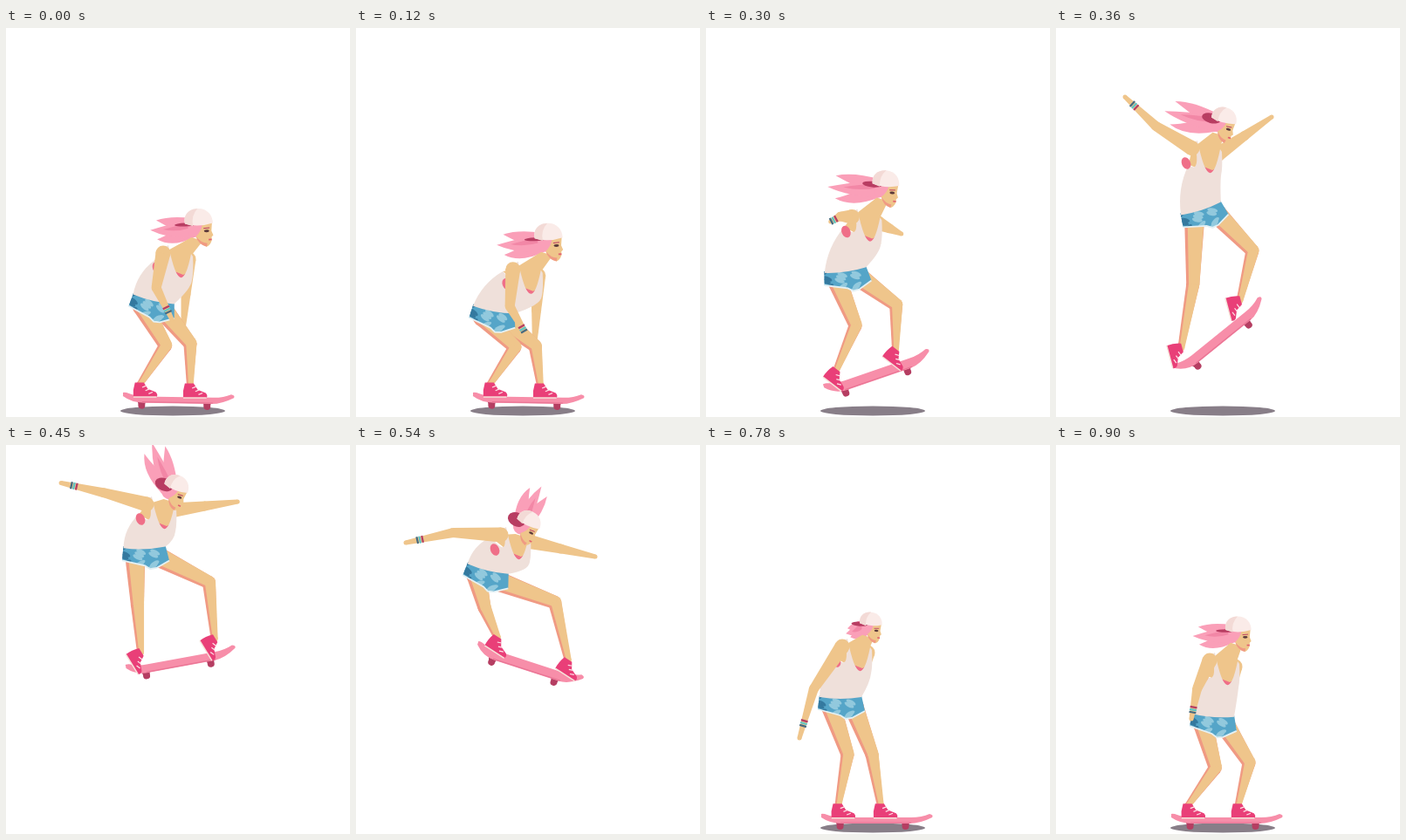
These frames come from a looping animation (394x446 px, 930 ms). An HTML page with a canvas:

```html
<!DOCTYPE html>
<html lang="en">
<head>
<meta charset="utf-8">
<title>Skater</title>
<style>
  html, body { margin: 0; width: 100%; height: 100%; overflow: hidden; background: #fff; }
  canvas { display: block; width: 394px; height: 446px; }
</style>
</head>
<body>
<canvas id="stage" width="394" height="446"></canvas>
<script>
const LOOP = 930, STEP = 30, DECK = 127, HIPS = 48;
const ctx = document.getElementById('stage').getContext('2d');
const C = {
  skin: '#efc58b', shade: '#f09a83', hair: '#fa9fb8', hairDark: '#f287a6',
  cap: '#faebe8', capShade: '#f3dad6', visor: '#b83d62', tank: '#efe0da',
  denim: '#55a5c8', denimLight: '#92c9dd', denimDark: '#34799f',
  shoe: '#e93f78', deck: '#f78ea9', deckDark: '#ea7595', wheel: '#b53e62',
  bra: '#ef6f88', ink: '#5b3a3a', shadow: '#887e88'
};

// Key poses; everything else is derived from these few joints.
// head: x, y, tilt, size    hair: angle, length    hips: x, y, tilt
// knees: sideways bend of each leg    arm: hand x, y, elbow bend
// board: tail x, y, angle    feet: tilt, place of the front foot on the deck
const poses = [
  { at: 0, head: [220, 225, -2, 1], hair: [177, 49], collar: [200, 256], hips: [169, 311, 13],
    arm: [190, 334, -13], farHand: [203, 345], knees: [28, 16], board: [134, 419, 1], feet: [0, .6] },
  { at: 240, head: [219, 249, -2, 1], hair: [177, 56], collar: [199, 283], hips: [153, 332, 4],
    arm: [200, 365, -12], farHand: [206, 370], knees: [35, 19], board: [134, 419, 1], feet: [0, .6] },
  { at: 360, head: [191, 107, 15, .91], hair: [193, 62], collar: [176, 136], hips: [166, 207, -18],
    arm: [79, 79, 5], farHand: [247, 102], knees: [6, 29], board: [135, 388, -39], feet: [75, .83] },
  { at: 540, head: [196, 91, 25, .88], hair: [297, 50], collar: [186, 101], hips: [151, 142, 14],
    arm: [57, 112, -7], farHand: [274, 128], knees: [-3, 33], board: [140, 226, 18], feet: [33, .82] },
  { at: 660, head: [195, 160, 17, .81], hair: [218, 42], collar: [186, 175], hips: [162, 212, 3],
    arm: [82, 230, -6], farHand: [267, 191], knees: [0, 10], board: [146, 350, -7], feet: [12, .71] },
  { at: 780, head: [188, 206, 4, .8], hair: [162, 24], collar: [176, 229], hips: [154, 289, 0],
    arm: [107, 336, -9], farHand: [175, 285], knees: [15, 6], board: [132, 424, 0], feet: [0, .53] },
  { at: 900, head: [208, 213, 0, .92], hair: [177, 46], collar: [196, 245], hips: [180, 310, 4],
    arm: [155, 314, -4], farHand: [196, 305], knees: [23, 20], board: [132, 424, 0], feet: [0, .6] }
];

// Monotone cubic interpolation around the loop.
const count = poses.length;
const wrap = i => (i + count) % count;
const span = i => (poses[wrap(i + 1)].at - poses[wrap(i)].at + LOOP) % LOOP;

function valueAt(part, n, i, u) {
  const v = k => poses[wrap(k)][part][n];
  const slope = k => (v(k + 1) - v(k)) / span(k);
  const tangent = k => {
    const a = slope(k - 1), b = slope(k);
    return a * b <= 0 ? 0 : 2 * a * b / (a + b);
  };
  const h = span(i), w = 1 - u;
  return v(i) * (1 + 2 * u) * w * w + tangent(i) * h * u * w * w +
    v(i + 1) * u * u * (3 - 2 * u) - tangent(i + 1) * h * u * u * w;
}

function poseAt(t) {
  let i = count - 1;
  while (poses[i].at > t) i--;
  const u = (t - poses[i].at) / span(i), out = {};
  for (const part in poses[0])
    if (part !== 'at') out[part] = poses[0][part].map((_, n) => valueAt(part, n, i, u));
  return out;
}

// Extra height at the top of the jump.
function hop(t) {
  const u = (t - 360) / 180;
  return 180 * Math.max(0, u * (1 - u));
}

const rad = deg => deg * Math.PI / 180;
const add = (p, x, y) => [p[0] + x, p[1] + y];
const mix = (a, b, k) => [a[0] + (b[0] - a[0]) * k, a[1] + (b[1] - a[1]) * k];
const local = ([x, y, deg], dx, dy) => {
  const c = Math.cos(rad(deg)), s = Math.sin(rad(deg));
  return [x + dx * c - dy * s, y + dx * s + dy * c];
};
const bent = (a, b, bend) => {
  const len = Math.hypot(b[0] - a[0], b[1] - a[1]) || 1;
  return [a, add(mix(a, b, .5), (b[1] - a[1]) / len * bend, (a[0] - b[0]) / len * bend), b];
};

function poly(points, color) {
  ctx.beginPath();
  points.forEach(p => ctx.lineTo(...p));
  ctx.closePath();
  ctx.fillStyle = color;
  ctx.fill();
}
function path(d, color) {
  ctx.fillStyle = color;
  ctx.fill(new Path2D(d));
}
function oval(x, y, rx, ry, color, tilt = 0) {
  ctx.beginPath();
  ctx.ellipse(x, y, rx, ry, tilt, 0, 7);
  ctx.fillStyle = color;
  ctx.fill();
}
function line(a, b, width, color) {
  ctx.beginPath();
  ctx.moveTo(...a);
  ctx.lineTo(...b);
  ctx.lineWidth = width;
  ctx.strokeStyle = color;
  ctx.stroke();
}
function placed([x, y], deg, scale, draw) {
  ctx.save();
  ctx.translate(x, y);
  ctx.rotate(rad(deg));
  ctx.scale(scale, scale);
  draw();
  ctx.restore();
}

function limb(joints, widths, color) {
  joints.forEach((p, i) => {
    oval(...p, widths[i] / 2, widths[i] / 2, color);
    if (!i) return;
    const q = joints[i - 1], angle = Math.atan2(p[1] - q[1], p[0] - q[0]);
    const nx = -Math.sin(angle) / 2, ny = Math.cos(angle) / 2;
    const a = widths[i - 1], b = widths[i];
    poly([add(q, nx * a, ny * a), add(p, nx * b, ny * b),
      add(p, -nx * b, -ny * b), add(q, -nx * a, -ny * a)], color);
  });
}
const arm = joints => limb(joints, [17, 11, 5], C.skin);

function leg(hip, knee, foot, tilt) {
  const joints = bent(hip, foot, knee), widths = [23, 15, 7];
  limb(joints, widths, C.shade);
  limb(joints.map(p => add(p, 1.5, -.8)), widths.map(w => w * .82), C.skin);
  placed(foot, tilt, .92, () => {
    path('M-6-2L5-2L10 6L20 10Q23 13 21 16L-8 16Q-9 7-6-2Z', C.shoe);
    line([-8, 16], [21, 16], 1.6, '#f6e3da');
    for (const x of [4, 8, 12]) line([x - 1, x], [x + 4, x - 2], 1.3, '#fde4e8');
  });
}

function bracelet([, elbow, hand]) {
  const deg = Math.atan2(hand[1] - elbow[1], hand[0] - elbow[0]) * 180 / Math.PI;
  placed(mix(elbow, hand, .7), deg, 1, () => {
    [C.wheel, '#5fc4c4', '#476a80'].forEach((color, i) =>
      line([i * 3 - 3, -4], [i * 3 - 3, 4], 2.2, color));
  });
}

function board([x, y, deg]) {
  const thick = Math.min(11, 7 + Math.abs(deg) / 4), low = 3 + thick;
  placed([x, y], deg, 1, () => {
    for (const k of [.17, .76]) {
      path(`M${DECK * k - 5} ${low - 2}h10l-2 6h-6Z`, C.wheel);
      oval(DECK * k, low + 3, 4, 4, C.wheel);
    }
    path(`M0 0Q-1-2 4-1Q14 3 24 3H${DECK - 24}Q${DECK - 12} 3 ${DECK - 3}-1Q${DECK + 2} 0 ${DECK} 3` +
      `Q${DECK - 14} ${low} ${DECK - 26} ${low}H24Q10 ${low} 0 3Z`, C.deck);
    line([22, low - 1], [DECK - 24, low - 1], 1.2, C.deckDark);
  });
}

function shorts([x, y, deg]) {
  const w = HIPS / 2;
  placed([x, y], deg, 1, () => {
    const hem = `L${w + 4} 16L13 24L6 25L0 21L${-w - 2} 14`;
    ctx.save();
    const shape = new Path2D(`M${-w} -2H${w}${hem}Z`);
    ctx.fillStyle = C.denim;
    ctx.fill(shape);
    ctx.clip(shape);
    for (let i = 0; i < 14; i++)
      oval(i * 17 % 50 - 25, i * 11 % 23, 6, 2.5, i % 3 ? C.denimLight : C.denimDark, i % 2 - .5);
    ctx.restore();
    ctx.lineWidth = 1.8;
    ctx.strokeStyle = '#e4f1f5';
    ctx.stroke(new Path2D('M' + hem.slice(1)));
  });
}

function torso(s, shoulder, farShoulder) {
  const k = s.collar, back = local(s.hips, -HIPS / 2, 0), front = local(s.hips, HIPS / 2, 0);
  const dx = s.hips[0] - k[0], dy = s.hips[1] - k[1], len = Math.hypot(dx, dy);
  const d = [dx / len, dy / len], n = [-d[1], d[0]];
  const pit = add(k, d[0] * 24 + n[0] * 21, d[1] * 24 + n[1] * 21);
  const spine = add(mix(pit, back, .5), n[0] * 9, n[1] * 9);
  const bust = add(k, 13, 33), dip = add(k, 0, 30), jaw = local(s.head, -2, 15 * s.head[3]);
  poly([add(jaw, -6, 0), shoulder, pit, dip, bust, farShoulder, add(jaw, 7, 4)], C.skin);
  poly([add(dip, -7, -7), add(dip, 0, 2), add(dip, 9, -6), add(dip, 3, -3)], C.bra);
  ctx.beginPath();
  ctx.moveTo(...add(k, -14, -7));
  ctx.quadraticCurveTo(...add(k, 0, 62), ...add(k, 12, 3));
  ctx.lineTo(...add(k, 14, 6));
  ctx.quadraticCurveTo(...add(bust, 2, -8), ...bust);
  ctx.quadraticCurveTo(...add(bust, -1, 10), ...front);
  ctx.quadraticCurveTo(...local(s.hips, 0, 4), ...back);
  ctx.quadraticCurveTo(...spine, ...pit);
  ctx.quadraticCurveTo(...add(k, -10, 32), ...add(k, -17, -5));
  ctx.fillStyle = C.tank;
  ctx.fill();
  oval(...add(shoulder, -7, 17), 5, 7, C.bra, -.4);
}

function hair([x, y, tilt, size], [angle, len]) {
  const root = local([x, y, tilt], -6 * size, 4 * size), r = 11 * size;
  placed(root, angle, 1, () => {
    oval(0, 0, r + 1, r, C.hair);
    for (const k of [-1, 1, 0]) {
      const tip = len * (1 - .15 * Math.abs(k)), side = k * len * .22;
      path(`M0 ${-r}Q${tip * .6} ${side - r} ${tip} ${side}Q${tip * .6} ${side + 5} 0 ${r}Z`, C.hair);
    }
    path(`M4 0Q${len * .4}-4 ${len * .7} 0Q${len * .4} 4 4 5Z`, C.hairDark);
  });
}

function head([x, y, tilt, size]) {
  placed([x, y], tilt, size, () => {
    path('M-5-2L16-2L15 8L17 13L15 15L15 19Q13 25 9 26Q0 23-3 14Z', C.skin);
    path('M-3 14Q3 22 10 22L9 26Q0 24-3 14Z', C.shade);
    path('M-12-1L5-1Q4 8-3 14L-11 12Z', C.hair);
    oval(9.5, 8, 3, 1.5, C.ink);
    line([6, 5], [13, 4.5], 1, C.visor);
    line([11.5, 18], [15, 18], 1.8, '#e35f6f');
    oval(-15, 0, 12, 2 + Math.max(0, tilt) * .28, C.visor);
    path('M-15-1C-17-12-9-18 0-18C11-18 17-10 17-1Q0 4-15-1Z', C.cap);
    path('M-15-1C-17-12-9-18 0-18Q-8-10-6 2Z', C.capShade);
  });
}

function render(t) {
  const s = poseAt(t), [tilt, stance] = s.feet;
  const shoulder = add(s.collar, -20, 2), farShoulder = add(s.collar, 9, 9);
  const near = bent(shoulder, s.arm, s.arm[2]).map(p => p.slice(0, 2));
  ctx.fillStyle = '#fff';
  ctx.fillRect(0, 0, 394, 446);
  if (t < 450 || t >= 600) oval(191, 439, 60 - hop(t) / 4, 5.5, C.shadow);
  ctx.save();
  ctx.translate(0, -hop(t));
  board(s.board);
  arm(bent(farShoulder, s.farHand, 0));
  leg(local(s.hips, 15, 11), s.knees[1], local(s.board, DECK * stance, -11), tilt);
  leg(local(s.hips, -11, 10), s.knees[0], local(s.board, DECK * .15, -11), tilt);
  shorts(s.hips);
  hair(s.head, s.hair);
  torso(s, shoulder, farShoulder);
  arm(near);
  bracelet(near);
  head(s.head);
  ctx.restore();
}

const start = performance.now();
function tick() {
  const t = (performance.now() - start) % LOOP;
  render(Math.floor(t / STEP) * STEP);
  requestAnimationFrame(tick);
}
tick();
</script>
</body>
</html>
```
